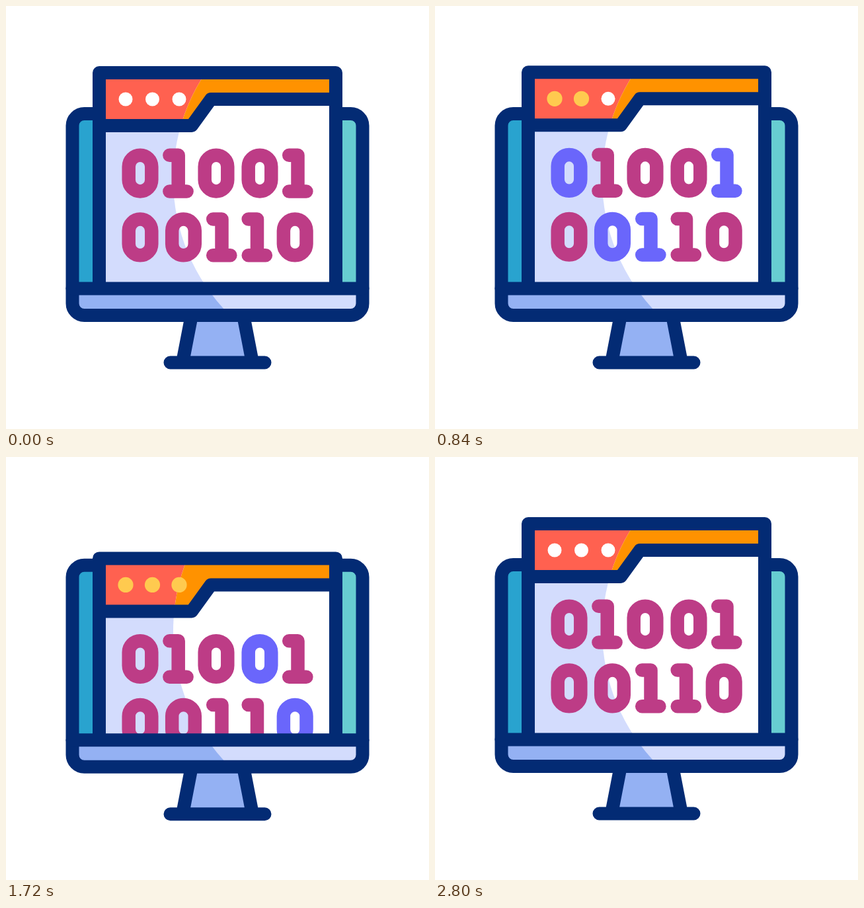
Recreate the animation shown at these times as an HTML page. Size 640 by 640 pixels, loop 3000 ms.

```html
<!DOCTYPE html>
<html lang="en">
<head>
<meta charset="utf-8">
<title>Binary screen</title>
<style>
html, body { margin: 0; width: 100%; height: 100%; overflow: hidden; background: #fff; }
svg { display: block; width: 100vw; height: 100vh; }
.line { fill: none; stroke: #032b74; stroke-width: 20; stroke-linecap: round; stroke-linejoin: round; }
.digit { fill: none; stroke-width: 20.5; stroke-linecap: round; stroke-linejoin: round; }
</style>
</head>
<body>
<svg viewBox="0 0 640 640">
  <defs>
    <clipPath id="disc"><circle class="mon" cx="543" cy="262" r="290"/></clipPath>
    <clipPath id="above"><rect class="mon" x="0" y="-100" width="640" height="528"/></clipPath>
  </defs>

  <g class="mon">
    <path fill="#94b1f3" d="M280 470H360L372 535H268Z"/>
    <path class="line" d="M280.5 470L268.5 532M359.5 470L371.5 532M248.5 539.5H391.5"/>
    <rect x="100.5" y="163" width="439" height="305" rx="18" fill="#29a3cf"/>
    <rect x="100.5" y="427" width="439" height="41" rx="18" fill="#94b1f3"/>
  </g>
  <g clip-path="url(#disc)">
    <g class="mon">
      <rect x="100.5" y="163" width="439" height="270" rx="18" fill="#67cdd1"/>
      <rect x="100.5" y="427" width="439" height="41" rx="18" fill="#d3dcfd"/>
    </g>
  </g>
  <g class="mon">
    <rect class="line" x="100.5" y="163" width="439" height="305" rx="18"/>
  </g>

  <g clip-path="url(#above)">
    <g class="win">
      <rect x="141" y="101" width="358" height="500" fill="#d3dcfd"/>
      <path fill="#ff6150" d="M141 101H499V141H310L281 181H141Z"/>
    </g>
    <g clip-path="url(#disc)">
      <g class="win">
        <rect x="141" y="101" width="358" height="500" fill="#fff"/>
        <path fill="#ff9200" d="M141 101H499V141H310L281 181H141Z"/>
      </g>
    </g>
    <g class="win">
      <path class="line" d="M141 600V101H499V600M141 181H281L310 141H499"/>
      <g id="dots"></g>
      <g id="digits"></g>
    </g>
  </g>
  <g class="mon"><path class="line" d="M100.5 427.5H539.5"/></g>
</svg>

<script>
const STEP = 40, LOOP = 3000, LAST = 2800;

// [time, vertical offset]
const monKeys = [[150, 0], [476, -10], [1240, 11.5], [1440, 11.5], [2000, -10], [2800, 0]];
const winKeys = [[172, 0], [590, -37.5], [1440, 139], [1447, 139], [2000, -37.5], [2800, 0]];

// [glyph, left edge, highlighted from, until]
const rows = [
  [[0, 175.5, 120, 1000], [1, 237.2, 200, 560], [0, 290.5, 1040, 1480], [0, 356.5, 1520, 2000], [1, 418, 240, 960]],
  [[0, 175.5, 1080, 1440], [0, 241, 640, 1040], [1, 303, 280, 920], [1, 356.5, 1160, 1560], [0, 409.7, 1560, 2080]]
];
const glyphs = [
  "M10.2 27.5a17.3 17.3 0 0 1 34.6 0v20a17.3 17.3 0 0 1-34.6 0z",
  "M10.2 10.2H23.5V64.8M10.2 64.8H36.4"
];

const $ = id => document.getElementById(id);

function add(parent, tag, attrs) {
  const el = document.createElementNS("http://www.w3.org/2000/svg", tag);
  for (const k in attrs) el.setAttribute(k, attrs[k]);
  return parent.appendChild(el);
}

const dots = [181, 221.5, 262].map(cx => add($("dots"), "circle", { cx, cy: 141 }));
const digits = rows.flatMap((row, r) => row.map(([glyph, x, from, to]) => ({
  el: add($("digits"), "path", {
    class: "digit", d: glyphs[glyph], transform: `translate(${x} ${215.6 + r * 96.8})`
  }),
  from, to
})));

function track(keys, t) {
  if (t <= keys[0][0]) return keys[0][1];
  for (let i = 1; i < keys.length; i++) {
    const [t0, a] = keys[i - 1], [t1, b] = keys[i];
    if (t <= t1) {
      const u = (t - t0) / (t1 - t0);
      return a + (b - a) * u * u * (3 - 2 * u);
    }
  }
  return keys[keys.length - 1][1];
}

function shift(name, dy) {
  for (const el of document.querySelectorAll("." + name))
    el.setAttribute("transform", `translate(0 ${dy.toFixed(2)})`);
}

function draw(now) {
  const t = Math.min(LAST, Math.floor((now % LOOP) / STEP) * STEP);
  shift("mon", track(monKeys, t));
  shift("win", track(winKeys, t));

  // The lights run as a wave, four times per loop.
  dots.forEach((dot, i) => {
    const phase = t % 700 - 20 - i * 110;
    const on = phase >= 0 && phase < 340;
    dot.setAttribute("fill", on ? "#ffca4f" : "#fff");
    dot.setAttribute("r", on ? 11.6 : 10.5);
  });
  for (const { el, from, to } of digits)
    el.setAttribute("stroke", t >= from && t < to ? "#6a66fb" : "#bd3c86");
}

const start = performance.now();
function tick() {
  draw(performance.now() - start);
  requestAnimationFrame(tick);
}
tick();
</script>
</body>
</html>
```
